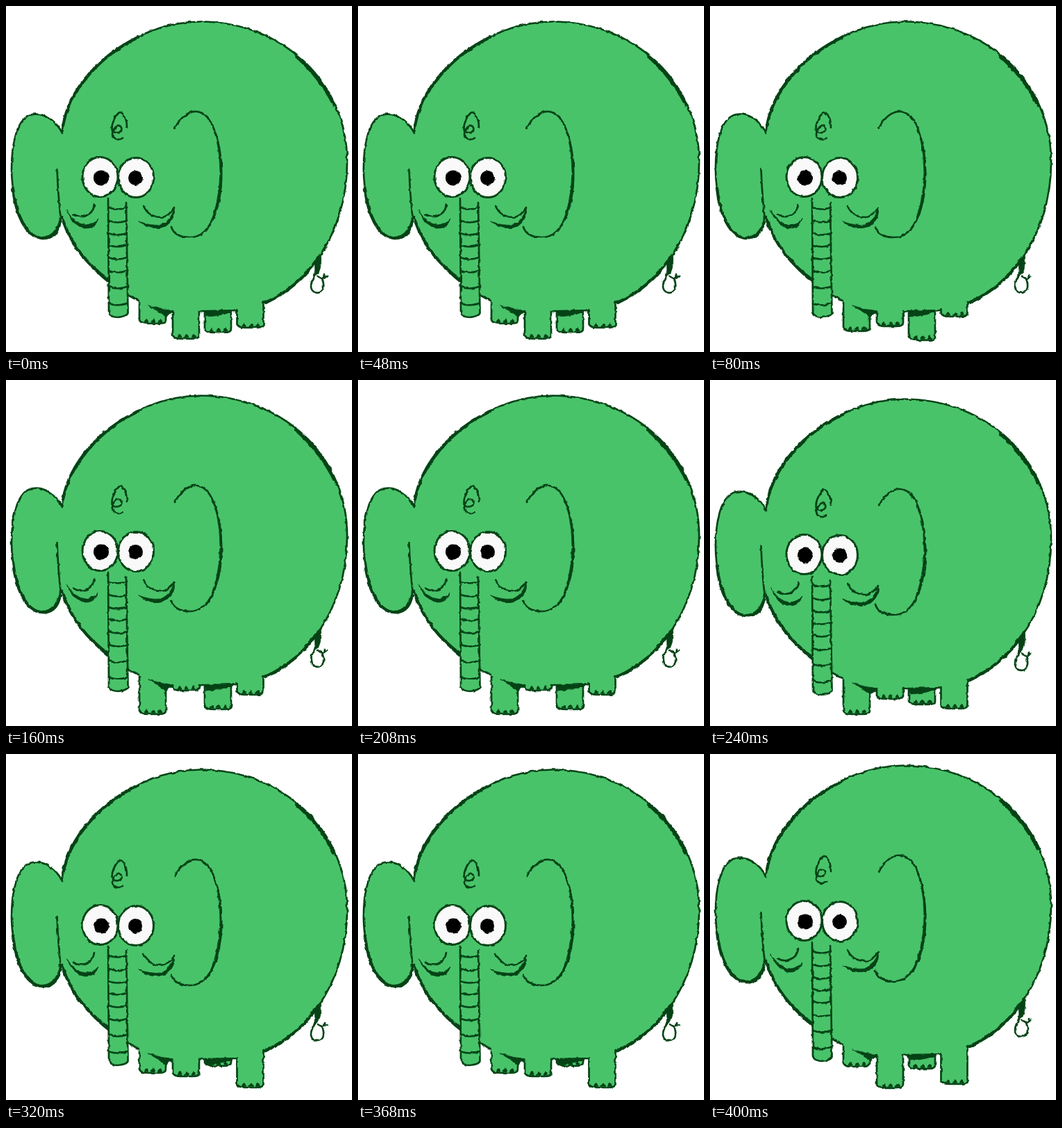
Animation, 498 px wide and 498 px high, one loop 0.48 s. Source, as an HTML page:

```html
<!DOCTYPE html>
<html lang="en">
<head>
<meta charset="utf-8">
<title>Walking elephant</title>
<style>
  html, body { margin: 0; width: 100%; height: 100%; overflow: hidden; background: #fff; }
  svg { display: block; width: 100%; height: 100%; }
  path, ellipse { fill: #49c36a; stroke: #054316; stroke-width: 2.7; stroke-linecap: round; stroke-linejoin: round; }
  .line path { fill: none; }
  .bold path { fill: none; stroke-width: 4.2; }
  .ink path, path.ink { fill: #054316; stroke-width: .8; }
  .skin { stroke: none; }
  .eye { fill: #f9f9f9; stroke-width: 3; }
  .pupil { fill: #000; stroke: none; }
</style>
</head>
<body>
<svg viewBox="0 0 498 498">
  <filter id="rough" filterUnits="userSpaceOnUse" x="0" y="0" width="498" height="498" color-interpolation-filters="sRGB">
    <feTurbulence id="noise" type="fractalNoise" baseFrequency=".13" numOctaves="2"/>
    <feDisplacementMap in="SourceGraphic" scale="3.6" xChannelSelector="R" yChannelSelector="G"/>
  </filter>
  <g filter="url(#rough)">
    <g id="far"></g>

    <g class="bob">
      <path d="M80,183 C88,110 175,22.500 280,22.500 C398,22.500 491,110 491,224 C491,330 430,420 335,438 L240,440 C190,432 110,390 80,303"/>
      <path d="M81,183 C70,161 52,154 38,156 C15,160 8,200 8,235 C9,285 25,332 53,335 C70,336 79,322 78,303 L81,303"/>
      <g class="bold">
        <path d="M82,172 C92,118 135,72 190,45"/>
        <path d="M418,73 Q452,103 472,143"/>
        <path d="M82,309 Q100,360 147,394"/>
        <path d="M374,427 Q422,404 448,364"/>
        <path d="M10,262 C14,300 28,331 50,334 Q70,335 78,311"/>
        <path d="M287,440 H324"/>
      </g>
      <g class="ink">
        <path d="M287,440 H324 Q306,447 288,447Z"/>
        <path d="M443,368 L453,355 Q455,373 450,384 L442,391 Q447,380 443,368Z"/>
      </g>
      <g class="line">
        <path d="M448,381 C446,390 438,394 439,405 C441,415 455,416 457,405 C458,399 456,396 455,393 M449,389 L456,393 L462,389 M458,392 L459,387"/>
      </g>
    </g>

    <g id="near"></g>

    <g class="bob">
      <path class="ink" d="M205,431 Q222,437 240,439 V442 Q233,443 231,448 Q219,439 205,431Z"/>
      <path stroke-width="3" d="M147,277 L148,441 Q150,448 161,448 Q174,447 175.500,442 L173,283"/>
      <g id="rings" class="line"></g>

      <g class="line">
        <path d="M73.500,234 Q75,275 79,307"/>
        <path d="M243,176 C252,158 264,151 275,152 C300,155 310,205 310,240 C309,300 290,333 265,333 C250,333 241,328 238,318"/>
        <path d="M174,175 C174,160 167,150 162,154 C156,160 151,172 153,180 C160,185 168,181 166,175 C163,168 155,174 153,184 C153,192 162,194 168,190"/>
        <path d="M97,300 C108,307 125,302 127,286 M198,288 Q205,304 224,304 Q234,303 242,291"/>
      </g>
      <g class="ink">
        <path d="M290,158 Q312,195 311,250 Q309,298 288,325 Q307,290 308,240 Q308,190 290,158Z"/>
        <path d="M87,294 Q99,314 115,315 Q126,314 133,306 Q128,321 113,320 Q96,316 87,294Z"/>
        <path d="M191,310 Q208,317 223,315 Q238,308 242,291 Q245,306 230,317 Q208,325 191,310Z"/>
      </g>

      <ellipse class="eye" cx="135.500" cy="246" rx="25.500" ry="28.500"/>
      <ellipse class="eye" cx="187" cy="247" rx="25.500" ry="28.500"/>
      <ellipse class="pupil" cx="137" cy="247.500" rx="11" ry="11"/>
      <ellipse class="pupil" cx="186.500" cy="247.500" rx="10.500" ry="10.500"/>
    </g>
  </g>
</svg>
<script>
const $ = id => document.getElementById(id);
const STEP = 80;
const bob = [0, 0, 0, 5, 0, -6];

// x: left edge, left/right: where the sides meet the belly, foot: sole height per step
const farLeg = { x: 286, left: 436, right: 436, foot: [470, 481, 474, 467, 449, 453] };
const nearLegs = [
  { x: 192, left: 427, right: 440, foot: [457, 468, 481, 481, 459, 450] },
  { x: 240, left: 439, right: 439, foot: [479, 461, 447, 459, 464, 481] },
  { x: 332.5, left: 437, right: 426, foot: [463, 447, 453, 473, 480, 475] }
];

function leg({ x, left, right, foot }, step) {
  const y = foot[step], dy = bob[step], r = x + 38;
  const toes = [7, 17, 27].map(o => `M${x + o},${y - 2} q3,-9 6,0Z`).join("");
  return `<path class="skin" d="M${x},${415 + dy} H${r} V${y - 4} H${x}Z"/>
    <path d="M${x},${left + dy} V${y - 5} Q${x + 2},${y} ${x + 12},${y} H${r - 10} Q${r},${y} ${r},${y - 5} V${right + dy}"/>
    <path class="ink" d="${toes}"/>`;
}

$("rings").innerHTML = [290, 309, 327, 344, 362, 381, 404, 428]
  .map(y => `<path d="M148,${y} q12,5 26,0"/>`).join("");

let shown = -1;
function draw(now) {
  const step = Math.floor(now / STEP) % bob.length;
  if (step !== shown) {
    shown = step;
    $("noise").setAttribute("seed", step + 1);
    document.querySelectorAll(".bob").forEach(g => g.setAttribute("transform", `translate(0 ${bob[step]})`));
    $("far").innerHTML = leg(farLeg, step);
    $("near").innerHTML = nearLegs.map(l => leg(l, step)).join("");
  }
  requestAnimationFrame(draw);
}
draw(performance.now());
</script>
</body>
</html>
```
